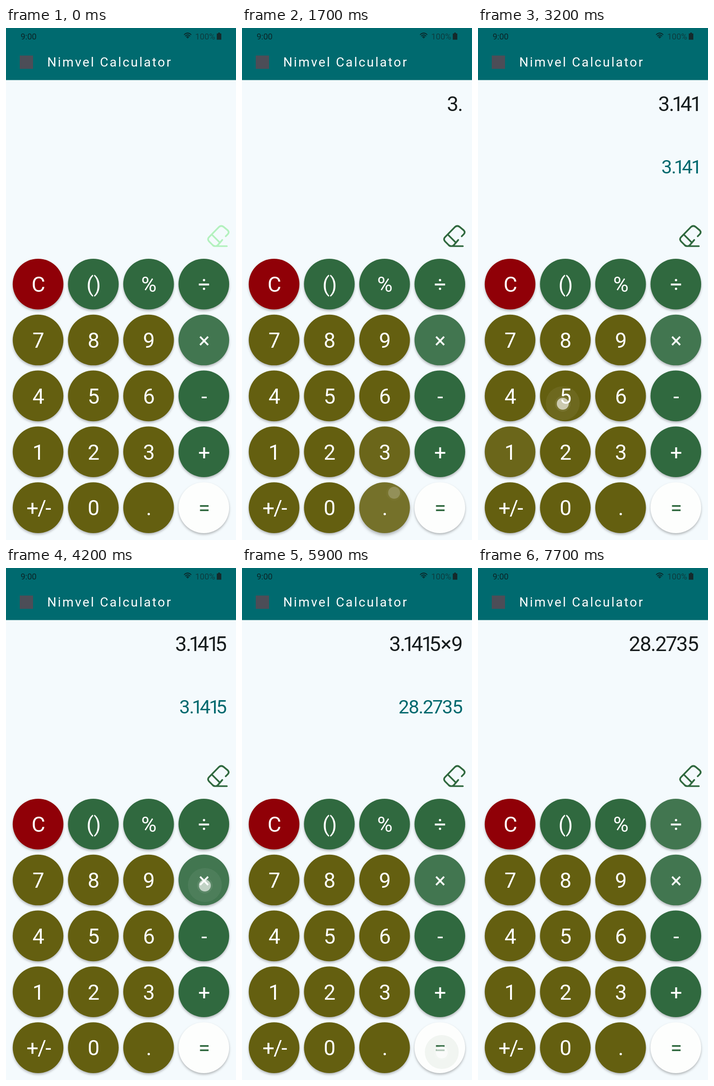
An HTML page for the animation above (7.8 s loop, 502 px wide and 1116 px high).

```html
<!DOCTYPE html>
<html lang="en">
<head>
<meta charset="utf-8">
<title>Nimvel Calculator</title>
<style>
  html, body { margin: 0; width: 100%; height: 100%; overflow: hidden; background: #f4fafd; }
  svg { display: block; width: 502px; height: 1116px; font-family: Roboto, "Open Sans", sans-serif; }
  .face { filter: drop-shadow(0 3px 2.5px rgba(0, 0, 0, .27)); }
  .face.lifted { filter: drop-shadow(0 4px 3.5px rgba(0, 0, 0, .3)); }
  .label { font-size: 46px; font-weight: 400; text-anchor: middle; }
  .readout { font-weight: 400; text-anchor: middle; }
  .title { font-size: 28px; font-weight: 400; letter-spacing: 3.1px; fill: #fff; }
  .status { font-size: 18px; }
  .line { fill: none; stroke-linecap: round; stroke-linejoin: round; }
</style>
</head>
<body>
<svg viewBox="0 0 502 1116">
  <defs><clipPath id="clip"><circle id="clipKey" r="55.3"/></clipPath></defs>
  <rect width="502" height="1116" fill="#f4fafd"/>
  <rect width="502" height="113.5" fill="#006a6f"/>

  <text class="status" x="32" y="24.5" fill="#0b2527">9:00</text>
  <g class="line" stroke="#0b2527" stroke-width="1.7">
    <path d="M389 14.5Q396.5 7.5 404 14.5M391.5 17.3Q396.5 12.7 401.5 17.3M394 19.8Q396.5 17.6 399 19.8"/>
  </g>
  <circle cx="396.5" cy="21.3" r="1.2" fill="#0b2527"/>
  <text class="status" x="413" y="24.5" fill="#0d3c3f">100%</text>
  <path d="M463 10h4v2h3v13.5h-10V12h3z" fill="#142a2c"/>

  <rect x="30" y="60" width="29" height="29" fill="#4c4d57"/>
  <text class="title" x="90" y="84">Nimvel Calculator</text>

  <text class="readout" id="entry" y="181" font-size="45" fill="#171d1e"></text>
  <text class="readout" id="result" y="317" font-size="41.5" fill="#00696e"></text>

  <path class="line" id="eraser" stroke-width="3.7" d="M479.5 454L484 449.5Q488 445.5 484 441L475 433.5Q470 429.5 465 433.5L443 456Q439 460 443 465L451 473Q453 475.5 457 475.5Q460 475.5 462.5 473L472 462M449 450L467 468M457 475.5H482"/>

  <g id="faces"></g>
  <circle id="ripple" clip-path="url(#clip)"/>
  <g id="labels"></g>
  <g id="touch" fill="#fff">
    <circle r="17" opacity=".12"/>
    <circle r="13"/>
  </g>
</svg>
<script>
const LOOP = 7800, STEP = 100, RADIUS = 55.3;
const GREEN = '#30693f', OLIVE = '#645f10', RED = '#900007', WHITE = '#fdfefd';
const REST = .085;
const LAYOUT = [
  ['C', '()', '%', '÷'], ['7', '8', '9', '×'], ['4', '5', '6', '-'],
  ['1', '2', '3', '+'], ['+/-', '0', '.', '=']
];

// key, touch point, time down, time up, entry and result after release
const PRESSES = [
  ['3', 328, 930, 1300, 1500, '3', '3'],
  ['.', 332, 1013, 1600, 1700, '3.', ''],
  ['1', 76, 932, 2100, 2100, '3.1', '3.1'],
  ['4', 78, 815, 2500, 2500, '3.14', '3.14'],
  ['1', 74, 930, 2900, 3000, '3.141', '3.141'],
  ['5', 185, 819, 3200, 3300, '3.1415', '3.1415'],
  ['×', 434, 692, 4200, 4300, '3.1415×', ''],
  ['9', 322, 697, 4800, 4900, '3.1415×9', '28.2735'],
  ['=', 436, 1056, 5900, 6100, '28.2735', '']
].map(([key, x, y, down, up, entry, result]) => ({ key, x, y, down, up, entry, result }));

const FADE = [.11, .08, .045];
const ADVANCE = { '.': 9.5, '1': 13.5, '4': 27, '7': 22 };
const keys = {};
const $ = id => document.getElementById(id);

function set(el, attrs) {
  for (const name in attrs) el.setAttribute(name, attrs[name]);
  return el;
}

function add(parent, tag, attrs) {
  const el = document.createElementNS('http://www.w3.org/2000/svg', tag);
  return parent.appendChild(set(el, attrs));
}

function faceColor(name, col) {
  if (name === 'C') return RED;
  if (name === '=') return WHITE;
  return col === 3 || name === '()' || name === '%' ? GREEN : OLIVE;
}

LAYOUT.forEach((row, r) => row.forEach((name, c) => {
  const cx = 70 + 120.6 * c, cy = 558.2 + 121.85 * r;
  const fill = faceColor(name, c), tint = name === '=' ? GREEN : '#fff';
  const face = add($('faces'), 'circle', { class: 'face', cx, cy, r: RADIUS, fill });
  const glow = add($('faces'), 'circle', { cx, cy, r: RADIUS, fill: tint });
  const label = add($('labels'), 'text', { class: 'label', x: cx + 0.7, y: cy + 16.8, fill: tint });
  if (name === '+/-') label.setAttribute('letter-spacing', -2);
  label.textContent = name;
  keys[name] = { cx, cy, face, glow, tint };
}));

// Right-aligned readout with proportional digit spacing
function write(el, text, scale) {
  if (el.textContent === text) return;
  let right = 481.5;
  const xs = [...text].reverse().map(ch => {
    const width = (ADVANCE[ch] || 24) * scale;
    right -= width;
    return (right + width / 2 + (ch === '1' ? 1.5 : 0)).toFixed(1);
  });
  el.setAttribute('x', xs.reverse().join(' '));
  el.textContent = text;
}

function draw(t) {
  const level = { '×': REST };
  let entry = '', result = '', held = null, touch = null, touchAlpha = 0;

  for (const p of PRESSES) {
    if (t < p.down) break;
    if (t < p.up) {
      held = touch = p;
      touchAlpha = .65;
      continue;
    }
    ({ entry, result } = p);
    const age = (t - p.up) / STEP;
    if (age < FADE.length) level[p.key] = (level[p.key] || 0) + FADE[age];
    if (age === 0) {
      touch = p;
      touchAlpha = .22;
    }
  }
  if (t >= 7600) level['÷'] = t >= 7700 ? REST : REST / 2;

  for (const name in keys) {
    const { face, glow } = keys[name];
    const alpha = level[name] || 0;
    glow.setAttribute('opacity', alpha);
    face.classList.toggle('lifted', alpha >= FADE[0]);
  }

  $('ripple').setAttribute('opacity', held ? .06 : 0);
  if (held) {
    const { cx, cy, tint } = keys[held.key];
    set($('clipKey'), { cx, cy });
    set($('ripple'), { cx: held.x, cy: held.y - 1, r: 37 + (t - held.down) * .16, fill: tint });
  }

  $('touch').setAttribute('opacity', touchAlpha);
  if (touch) $('touch').setAttribute('transform', `translate(${touch.x} ${touch.y})`);

  write($('entry'), entry, 1);
  write($('result'), result, .92);
  $('eraser').setAttribute('stroke', entry ? GREEN : '#b3f1be');
}

function tick() {
  draw(Math.floor(performance.now() % LOOP / STEP) * STEP);
  requestAnimationFrame(tick);
}
tick();
</script>
</body>
</html>
```
